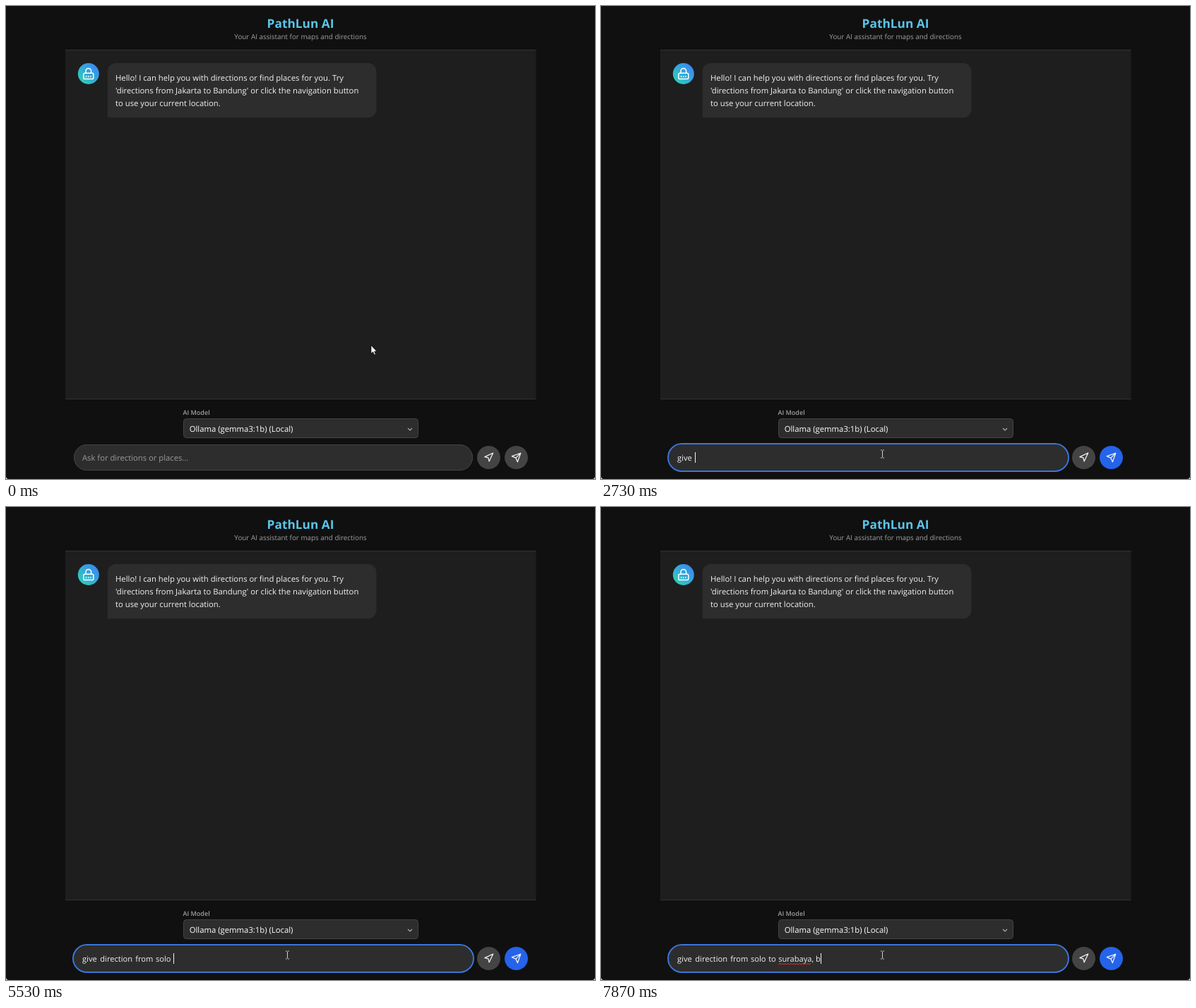
Recreate the animation shown at these times as an HTML page. Size 834 by 671 pixels, loop 8 s.

```html
<!DOCTYPE html>
<html lang="en">
<head>
<meta charset="utf-8">
<title>Map chat</title>
<style>
  html, body { margin: 0; width: 100%; height: 100%; overflow: hidden; background: #101010; }
  svg { display: block; }
  text {
    font: 11.3px "Open Sans", "Noto Sans", sans-serif;
    fill: #f2f2f2; white-space: pre; text-rendering: geometricPrecision;
  }
  .mid { text-anchor: middle; }
  #words text { font-size: 11.1px; }
  .icon { fill: none; stroke: #f4f4f4; stroke-width: 2; stroke-linecap: round; stroke-linejoin: round; }
</style>
</head>
<body>
<svg width="834" height="671" viewBox="0 0 834 671">
  <defs>
    <linearGradient id="avatar" x1="0" y1="1" x2="1" y2="0">
      <stop offset=".1" stop-color="#2fcfb8"/>
      <stop offset=".85" stop-color="#3a8af2"/>
    </linearGradient>
  </defs>

  <rect width="834" height="671" fill="#101010"/>
  <path d="M0 667Q0 671 4 671H0ZM834 667Q834 671 830 671H834Z" fill="#e8e8e8"/>

  <text class="mid" x="417" y="31" style="font-size:17.3px;font-weight:700;fill:#5bc5ea">PathLun AI</text>
  <text class="mid" x="417" y="47" style="font-size:9.85px;fill:#a0a0a0">Your AI assistant for maps and directions</text>

  <rect x="84" y="62" width="666.5" height="496" fill="#1e1e1e"/>
  <path d="M84 62.5H750.5M84 557.5H750.5" stroke="#333"/>

  <circle cx="116.8" cy="96" r="15" fill="url(#avatar)"/>
  <g fill="none" stroke="#fff" stroke-width="1.5" stroke-linecap="round">
    <rect x="109.8" y="95.2" width="14" height="8.4" rx="1.8"/>
    <path d="M113 95V92.2A3.8 3.8 0 0 1 120.6 92.2V95"/>
    <path d="M113.6 99.8v.6M116.8 99.8v.6M120 99.8v.6"/>
  </g>

  <path d="M155.7 81H512.5A12 12 0 0 1 524.5 93V146.3A12 12 0 0 1 512.5 158.3H143.7V93A12 12 0 0 1 155.7 81Z" fill="#2d2d2d"/>
  <text x="155" y="106">Hello! I can help you with directions or find places for you. Try</text>
  <text x="155" y="124">'directions from Jakarta to Bandung' or click the navigation button</text>
  <text x="155" y="142">to use your current location.</text>

  <text x="250.5" y="579.5" style="font-size:9px;font-weight:600;fill:#a0a0a0">AI Model</text>
  <rect x="251.5" y="585.5" width="332" height="27" rx="4" fill="#2d2d2d" stroke="#444"/>
  <text x="259.7" y="604" style="fill:#fff;font-weight:500">Ollama (gemma3:1b) (Local)</text>
  <path d="M569 599l3 3l3-3" fill="none" stroke="#b0b0b0" stroke-width="1.1"/>

  <rect x="96" y="622" width="565" height="37" rx="18.5" fill="#2d2d2d"/>
  <rect id="border" x="96.5" y="622.5" width="564" height="36" rx="18" fill="none" stroke="#444"/>
  <rect id="ring" x="95" y="621" width="567" height="39" rx="19.5" fill="none" stroke="#3c76d8" stroke-width="2"/>
  <text id="hint" x="108" y="645" style="font-size:11.25px;fill:#9a9a9a">Ask for directions or places...</text>
  <g id="words"></g>
  <path id="squiggle" fill="none" stroke="#e5332e"/>
  <rect id="caret" y="633" width="1" height="15" fill="#f4f4f4"/>

  <circle cx="683.5" cy="640.5" r="16.5" fill="#444"/>
  <path class="icon" transform="translate(676 632.8) scale(.625)" d="M3 11L22 2L13 21L11 13Z"/>
  <circle id="send" cx="722.5" cy="640.5" r="16.5"/>
  <path class="icon" transform="translate(715 633) scale(.625)" d="M22 2L15 22L11 13L2 9ZM22 2L11 13"/>

  <path id="arrow" d="M0 0V11.6L2.7 9.1L4.5 13.2L6.3 12.4L4.6 8.4H8Z" fill="#fff" stroke="#000" stroke-width=".6"/>
  <path id="beam" d="M-2.5 -5.5H-.8M.8 -5.5H2.5M0 -5V5M-2.5 5.5H-.8M.8 5.5H2.5" fill="none" stroke="#d0d0d0"/>
</svg>
<script>
const LOOP = 8000, FRAME = 200 / 3;
const FOCUS = 800, CARET_OFF = 1330, CARET_ON = 1870, CARET_OFF_2 = 2400;
const MISSPELT = 7670;

// Each word: text, left edge, time of every key (the space after it included).
const WORDS = [
  ["give", 108, [2470, 2530, 2600, 2670, 2730]],
  ["direction", 133.3, [2930, 3000, 3070, 3200, 3400, 3670, 3730, 3800, 4070, 4130]],
  ["from", 183.3, [4270, 4470, 4530, 4730, 4870]],
  ["solo", 211.9, [4930, 5070, 5130, 5330, 5530]],
  ["to", 237.2, [5730, 5870, 5930]],
  ["surabaya,", 251.2, [6070, 6130, 6470, 6530, 6730, 6800, 7130, 7270, 7600, 7670]],
  ["b", 304, [7870]]
];
const FIRST_KEY = WORDS[0][2][0];

const $ = id => document.getElementById(id);
const show = (id, on) => $(id).setAttribute("visibility", on ? "visible" : "hidden");
const clamp = v => Math.max(0, Math.min(1, v));
const smooth = v => v * v * (3 - 2 * v);
const mix = (a, b, k) => a + (b - a) * k;

const labels = WORDS.map(([, x]) => {
  const el = document.createElementNS("http://www.w3.org/2000/svg", "text");
  el.setAttribute("x", x);
  el.setAttribute("y", 645);
  $("words").append(el);
  return el;
});

let wave = "M251 649";
for (let i = 1; i <= 23; i++) wave += `L${251 + i * 2} ${i % 2 ? 647.4 : 649.2}`;
$("squiggle").setAttribute("d", wave);

function drawMouse(t) {
  const step = Math.min(8, Math.floor((t + 4) / FRAME));
  const k = smooth(step / 8);
  const x = mix(517, 398.5, k), y = mix(481.5, 635.5, k);
  const overInput = y > 622;
  show("arrow", !overInput);
  show("beam", overInput);
  $(overInput ? "beam" : "arrow").setAttribute("transform", `translate(${x} ${y})`);
}

function drawInput(t) {
  let caretX = 108;
  WORDS.forEach(([word, x, keys], i) => {
    const n = keys.filter(k => t >= k).length;
    labels[i].textContent = word.slice(0, n);
    if (n > word.length) caretX = WORDS[i + 1][1];
    else if (n) caretX = x + labels[i].getComputedTextLength();
  });
  $("caret").setAttribute("x", Math.round(caretX));
  show("caret", t >= FOCUS && t < CARET_OFF || t >= CARET_ON && t < CARET_OFF_2 || t >= FIRST_KEY);
  show("ring", t >= FOCUS);
  show("border", t < FOCUS);
  show("hint", t < FIRST_KEY);
  show("squiggle", t >= MISSPELT);
}

function drawSend(t) {
  const k = smooth(clamp((t - FIRST_KEY) / 200));
  const rgb = [[68, 37], [68, 99], [68, 235]].map(([a, b]) => Math.round(mix(a, b, k)));
  $("send").setAttribute("fill", `rgb(${rgb})`);
}

const start = performance.now();
function draw() {
  const t = (performance.now() - start) % LOOP;
  drawMouse(t);
  drawInput(t);
  drawSend(t);
  requestAnimationFrame(draw);
}
draw();
</script>
</body>
</html>
```
